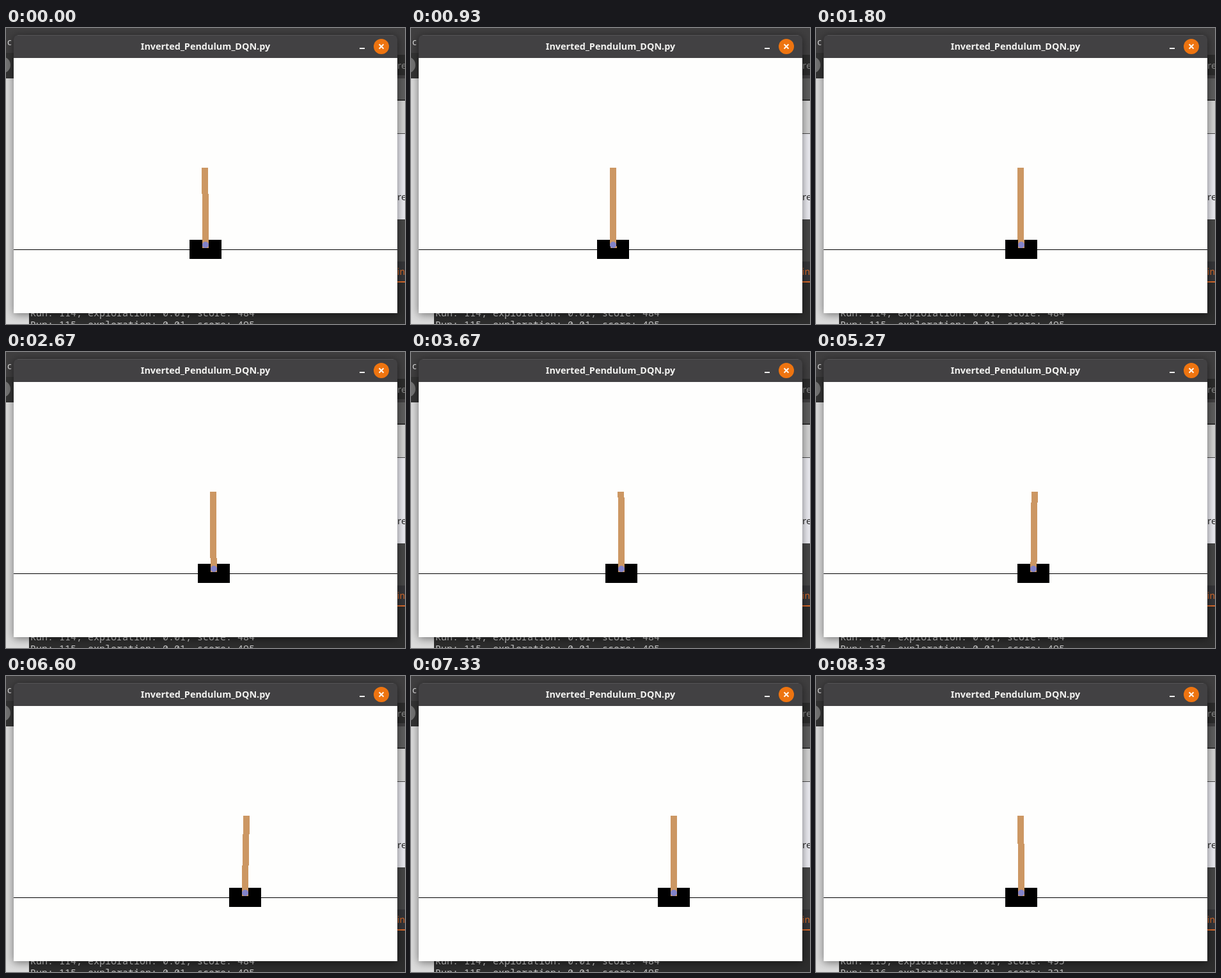
An HTML page with a canvas for the animation above (8.39 s loop, 624x464 px).

```html
<!DOCTYPE html>
<html lang="en">
<head>
<meta charset="utf-8">
<title>Inverted pendulum</title>
<style>
  html, body { margin: 0; width: 100%; height: 100%; overflow: hidden; background: #403f40; }
  canvas { display: block; }
</style>
</head>
<body>
<canvas id="stage" width="624" height="464"></canvas>
<script>
const ctx = document.getElementById('stage').getContext('2d');
const LOOP = 8.39;
const FPS = 15;
const RESET = 7.53;
const SWAY_START = 4;
const SWAY_LENGTH = 3.6;
const DRIFT = 4.7;
const REST_LEAN = -0.9;
const PIVOT_Y = 340;
const POLE_LENGTH = 121;
const SANS = '"Noto Sans", "Open Sans", sans-serif';
const MONO = '"Noto Sans Mono", "DejaVu Sans Mono", monospace';

// Steady drift, then the pole tips right and the cart speeds up after it.
function poseAt(t) {
  if (t >= RESET) return { x: 317.3 + DRIFT * (t - RESET), lean: REST_LEAN };
  const sway = Math.max(0, t - SWAY_START);
  return {
    x: 312.1 + DRIFT * t + 1.735 * sway ** 3,
    lean: REST_LEAN + 3.6 * Math.sin(Math.PI * (sway / SWAY_LENGTH) ** 1.5)
  };
}

function rect(color, x, y, w, h) {
  ctx.fillStyle = color;
  ctx.fillRect(x, y, w, h);
}

function disc(color, x, y, r) {
  ctx.fillStyle = color;
  ctx.beginPath();
  ctx.arc(x, y, r, 0, Math.PI * 2);
  ctx.fill();
}

function text(str, x, y, color, font, align = 'left') {
  ctx.fillStyle = color;
  ctx.font = font;
  ctx.textAlign = align;
  ctx.fillText(str, x, y);
}

function drawBrowser() {
  rect('#403f40', 0, 0, 624, 79);
  rect('#343434', 0, 39, 12, 40);
  disc('#747474', -6, 58, 13);
  rect('#dcdcdc', 0, 79, 36, 385);
  text('c', 2, 27, '#dcdcdc', '14px ' + SANS);

  rect('#2c2c2c', 608, 42, 16, 32);
  text('re', 612, 64, '#8a8a8a', '15px ' + SANS);
  rect('#5e5e5e', 608, 79, 16, 33);
  rect('#303030', 608, 112, 16, 2);
  rect('#d2d2d2', 608, 114, 16, 51);
  rect('#484848', 608, 165, 16, 1);
  rect('#ebebf1', 608, 166, 16, 134);
  text('re', 612, 270, '#2e2e2e', '15px ' + SANS);
}

function drawTerminal(firstRun, scores) {
  rect('#464646', 608, 300, 16, 66);
  rect('#353538', 608, 366, 16, 32);
  text('ain', 604, 387, '#d96a2a', '14px ' + SANS);
  rect('#d96a2a', 608, 397, 16, 2);
  rect('#2d2d2d', 608, 399, 16, 65);
  rect('#2d2d2d', 36, 440, 588, 24);
  scores.forEach((score, i) => text(
    `Run: ${firstRun + i}, exploration: 0.01, score: ${score}`,
    38, 452 + i * 18, '#c8c8c8', '15px ' + MONO));
}

function drawWindow() {
  ctx.save();
  ctx.shadowColor = 'rgba(0,0,0,.5)';
  ctx.shadowBlur = 14;
  ctx.shadowOffsetY = 2;
  ctx.fillStyle = '#424143';
  ctx.beginPath();
  ctx.roundRect(12, 11, 600, 436, [7, 7, 0, 0]);
  ctx.fill();
  ctx.restore();
  rect('#555456', 18, 11, 588, 1);
  rect('#fefefd', 12, 47, 600, 400);

  text('Inverted_Pendulum_DQN.py', 312, 34, '#f3f3f1', 'bold 14.4px ' + SANS, 'center');
  rect('#f3f3f1', 553, 31, 8, 2);
  disc('#ee7410', 587, 29, 12);
  ctx.strokeStyle = '#fff8f0';
  ctx.lineWidth = 2;
  ctx.beginPath();
  for (const side of [-3.5, 3.5]) {
    ctx.moveTo(587 - side, 25.5);
    ctx.lineTo(587 + side, 32.5);
  }
  ctx.stroke();
}

function drawCartPole({ x, lean }) {
  rect('#000', 12, 347, 600, 1);
  rect('#000', Math.round(x) - 25, 332, 50, 30);
  // whole-pixel rows keep the pole's edges stepped
  for (let y = 219; y < 345; y++) {
    const centre = Math.round(x + lean * (PIVOT_Y - y) / POLE_LENGTH);
    rect('#cc9763', centre - 5, y, 10, 1);
  }
  disc('#8282c8', Math.round(x), PIVOT_Y, 5);
}

function draw(seconds) {
  const t = Math.floor((seconds % LOOP) * FPS + 0.05) / FPS;
  drawBrowser();
  if (t < RESET) drawTerminal(114, [484, 495]);
  else drawTerminal(115, [495, 321]);
  drawWindow();
  drawCartPole(poseAt(t));
}

const start = performance.now();
function tick() {
  draw((performance.now() - start) / 1000);
  requestAnimationFrame(tick);
}
tick();
</script>
</body>
</html>
```
